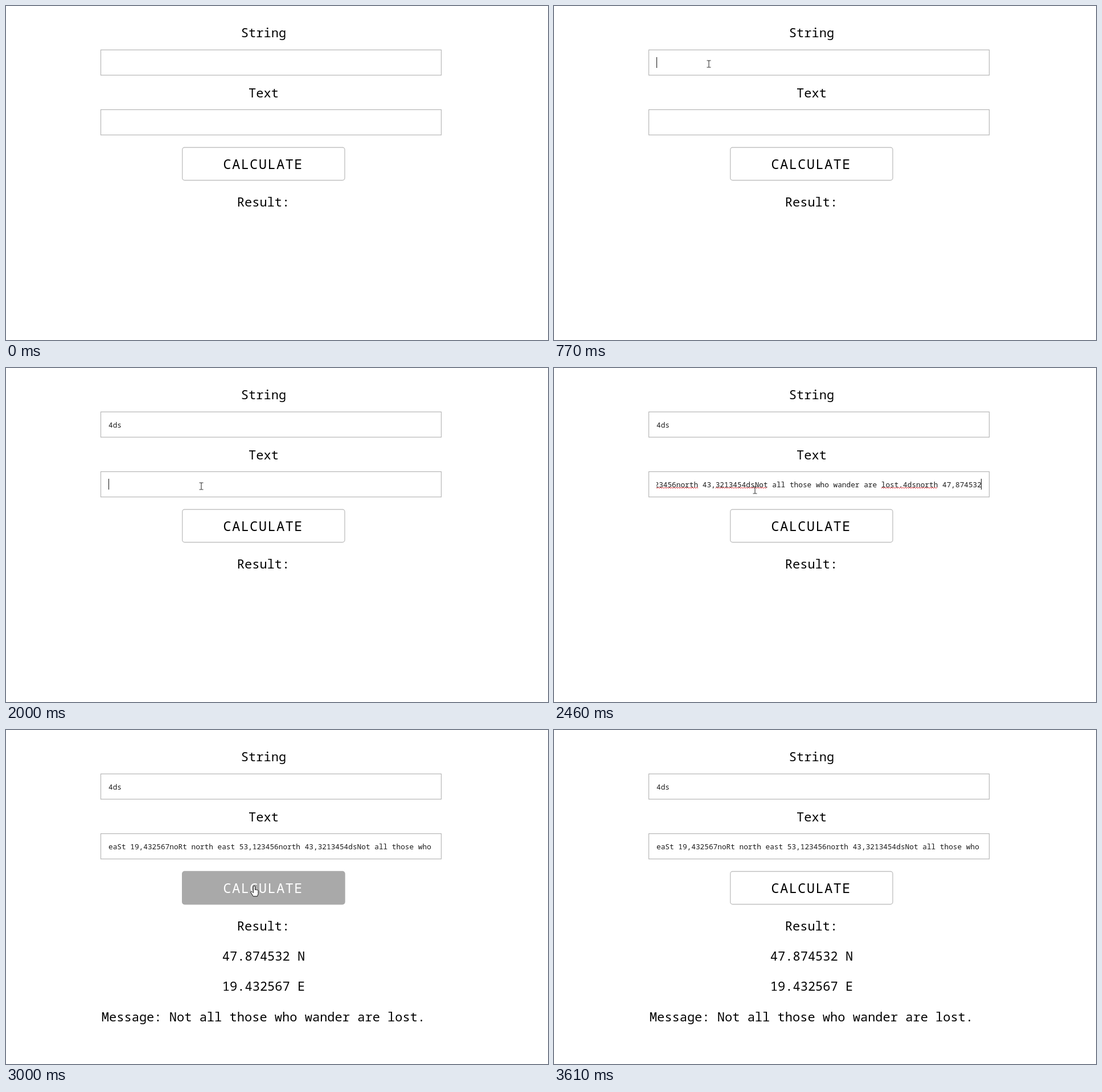
An HTML page that plays this animation: 952 by 588 pixels, repeating every 4310 ms.

```html
<!DOCTYPE html>
<html lang="en">
<head>
<meta charset="utf-8">
<title>Form demo</title>
<style>
html, body { margin: 0; width: 100%; height: 100%; overflow: hidden; background: #fff; }
svg { display: block; width: 952px; height: 588px; font: 22.04px "Noto Sans Mono", monospace; }
text { white-space: pre; }
.center { text-anchor: middle; }
.small { font-size: 12.77px; fill: #1c1c1c; }
.field { fill: #fff; stroke: #b6b6b6; stroke-width: 1.2; }
#button rect { fill: #fff; stroke: #c2c2c2; stroke-width: 1.4; }
#button text { font-size: 24px; letter-spacing: 1.2px; }
#button.hover rect { fill: #a9a9a9; stroke: #a9a9a9; }
#button.hover text { fill: #fff; }
#caret { stroke: #222; stroke-width: 1.1; }
#squiggles { fill: none; stroke: #e8292f; stroke-width: 1; }
#ibeam { fill: none; stroke: #333; stroke-width: 1.1; }
#arrow, #hand { fill: #fff; stroke: #111; stroke-width: 1; stroke-linejoin: round; }
</style>
</head>
<body>
<svg viewBox="0 0 952 588">
  <clipPath id="inner"><rect x="180" y="185" width="571" height="40"/></clipPath>

  <text class="center" x="452.5" y="55">String</text>
  <rect class="field" x="166.5" y="77.3" width="598" height="44.5"/>
  <text class="small" id="key" x="180" y="104.5"></text>

  <text class="center" x="452.5" y="161">Text</text>
  <rect class="field" x="166.5" y="182.5" width="598" height="44.5"/>
  <g clip-path="url(#inner)">
    <g id="scroll">
      <text class="small" id="message" x="180" y="209.5"></text>
      <path id="squiggles"/>
    </g>
  </g>
  <path id="caret" d="M.5 0v19"/>

  <g id="button">
    <rect x="309.7" y="249" width="285.3" height="57.7" rx="4"/>
    <text x="381.3" y="287">CALCULATE</text>
  </g>

  <text class="center" x="452" y="353">Result:</text>
  <g id="results" class="center">
    <text x="452.5" y="406">47.874532 N</text>
    <text x="452.5" y="459">19.432567 E</text>
    <text x="452" y="513">Message: Not all those who wander are lost.</text>
  </g>

  <g id="pointer">
    <path id="arrow" d="M0 0V16l3.7-3.4 2.4 5.7 2.4-1-2.4-5.6H11Z"/>
    <path id="ibeam" d="M-3.5-6h2.6L0-5.5.9-6H3.5M0-5.5V5.5M-3.5 6h2.6L0 5.5.9 6H3.5"/>
    <path id="hand" d="M-1.6 1.5a1.6 1.6 0 0 1 3.2 0V7c1-1 2.4-.8 2.8.4 1-.7 2.4-.3 2.6.9V14l-1.6 4.3h-7.2L-5.8 11.6c-.9-1.5 1-2.6 2-1.5l2.2 2Z"/>
  </g>
</svg>
<script>
const LOOP = 4310, FPS = 13, CHAR = 7.66, LEFT = 180, RIGHT = 751;
const MESSAGE = "eaSt 19,432567noRt north east 53,123456north 43,3213454dsNot all those who wander are lost.4dsnorth 47,874532";
const MISSPELLED = [[33, 44], [48, 60], [86, 99]];

// Pointer keys: step, x, y
const PATH = [
  [1, 468, 272], [3, 362, 182], [5, 285, 123], [6, 273, 112], [7, 278, 109],
  [8, 277, 108], [10, 272, 102], [19, 272, 102], [22, 351, 202], [25, 357, 217],
  [26, 343, 208], [31, 343, 208], [32, 353, 215], [33, 414, 261],
  [35, 436, 274.5], [42, 436, 274.5], [43, 490, 313], [46, 875, 568]
];

const el = id => document.getElementById(id);
const show = (id, visible) => { el(id).style.display = visible ? "" : "none"; };
const move = (id, x, y) => el(id).setAttribute("transform", `translate(${x} ${y})`);
const within = (v, low, high) => v >= low && v < high;

function zigzag([from, to]) {
  const start = LEFT + from * CHAR, end = LEFT + to * CHAR;
  let d = `M${start} 212`;
  for (let x = start + 2, up = true; x <= end; x += 2, up = !up) d += `L${x} ${up ? 210 : 212}`;
  return d;
}

function pointerAt(step) {
  const next = PATH.findIndex(key => key[0] >= step);
  const [s1, x1, y1] = PATH[next];
  if (s1 === step) return [x1, y1];
  const [s0, x0, y0] = PATH[next - 1];
  const k = (step - s0) / (s1 - s0);
  return [x0 + (x1 - x0) * k, y0 + (y1 - y0) * k];
}

function drawPointer(step, hover) {
  const visible = within(step, 1, 47);
  show("pointer", visible);
  if (!visible) return;
  const [x, y] = pointerAt(step);
  const inField = within(x, 167, 765) && (within(y, 77, 122) || within(y, 182, 227));
  move("pointer", x, y);
  show("hand", hover);
  show("ibeam", inField);
  show("arrow", !hover && !inField);
}

function draw(time) {
  const step = Math.floor((time % LOOP + 8) * FPS / 1000);
  const typed = step < 16 ? 0 : step < 19 ? 1 : step < 20 ? 2 : 3;
  const pasted = step >= 31, blurred = step >= 38;
  const hover = within(step, 33, 43);

  el("key").textContent = "4ds".slice(0, typed);
  el("message").textContent = pasted ? MESSAGE : "";
  move("scroll", pasted && !blurred ? RIGHT - LEFT - MESSAGE.length * CHAR : 0, 0);
  show("squiggles", pasted && !blurred);

  show("caret", within(step, 8, 38));
  if (step < 24) move("caret", LEFT + typed * CHAR - (typed ? .5 : 0), 90);
  else move("caret", pasted ? RIGHT - 1 : LEFT, 195);

  el("button").classList.toggle("hover", hover);
  show("results", step >= 39);
  drawPointer(step, hover);
}

el("squiggles").setAttribute("d", MISSPELLED.map(zigzag).join(""));
const begin = performance.now();
function tick() {
  draw(performance.now() - begin);
  requestAnimationFrame(tick);
}
tick();
</script>
</body>
</html>
```
